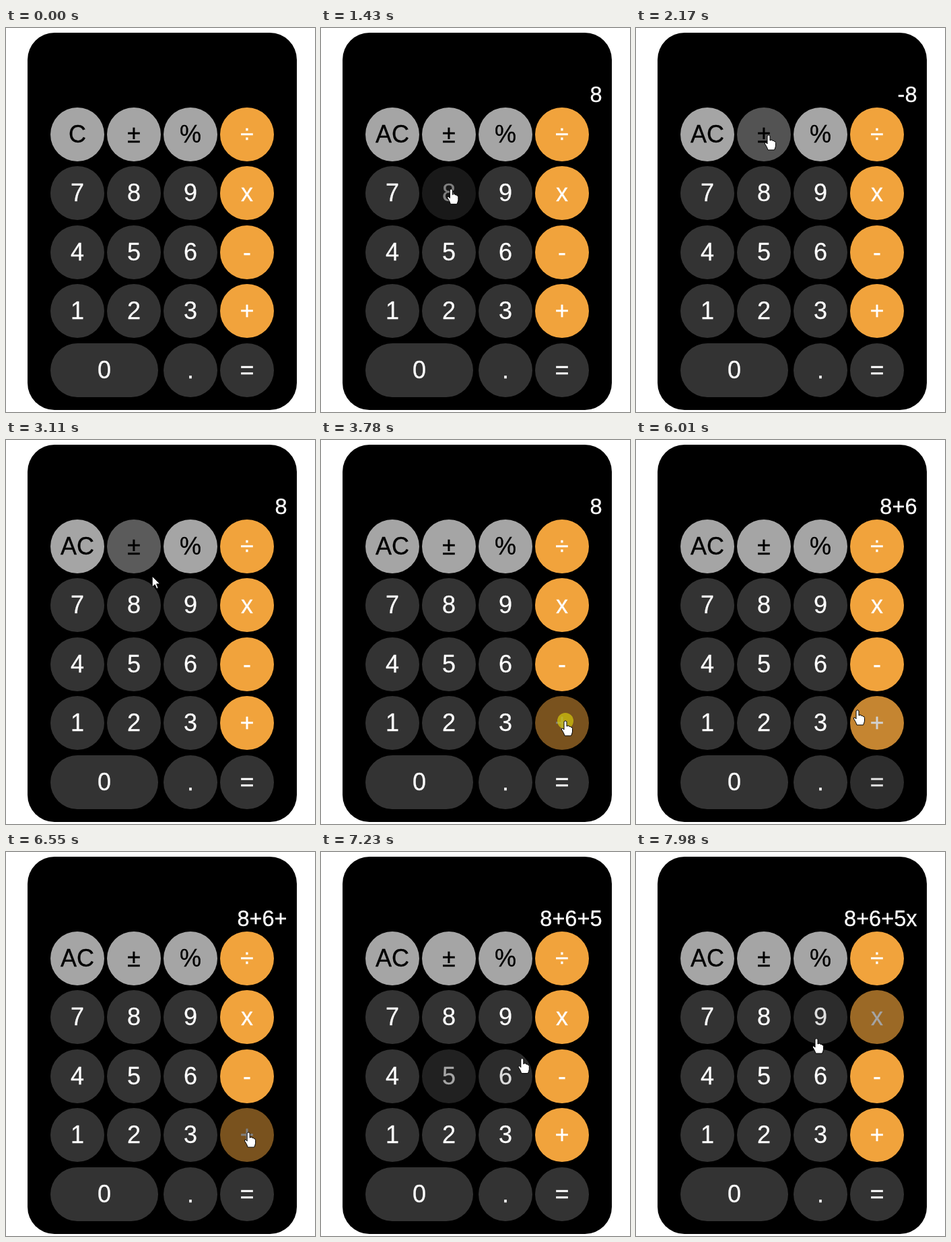
An HTML page that plays this animation: 459x570 px, repeating every 8000 ms.

```html
<!DOCTYPE html>
<html lang="en">
<head>
<meta charset="utf-8">
<title>Calculator</title>
<style>
  html, body { margin: 0; width: 100%; height: 100%; overflow: hidden; background: #fff; }
  svg { display: block; }
  text {
    font: 36px "Liberation Sans", Arial, sans-serif; text-anchor: middle;
    color: #fff; fill: currentColor; stroke: currentColor; stroke-width: .3;
  }
  .dark { color: #000; }
  #display { font-size: 32.5px; text-anchor: end; }
  .cursor { fill: #fff; stroke: #000; stroke-linejoin: round; }
</style>
</head>
<body>
<svg width="459" height="570" viewBox="0 0 459 570">
  <rect x="32" y="7" width="400" height="560" rx="40"/>
  <text id="display" x="417.5" y="110"></text>
  <g id="keys"></g>
  <g id="pointer">
    <circle id="dot" r="12" fill="#d4c80c" opacity=".7"/>
    <path id="arrow" class="cursor" d="M0 0V16L4 12.5 6.5 18.5 9 17.5 6.5 11.5H11.5Z"/>
    <path id="hand" class="cursor" d="M-2 1Q0-1.5 2 1V8L4 7Q6 7 6 8.5 8 7.6 8.5 9.5 10.5 9 10.5 11.5V16Q10 19 8.5 22H-1Q-2 18-5.5 13-6.5 10.5-4 11L-2 13Z"/>
  </g>
</svg>
<script>
const LOOP = 8000, FADE = 250, STEP = 5;
const $ = id => document.getElementById(id);

// Where the pointer rests and clicks; bend curves the way to a stop
const stops = [
  { arrive: 0, leave: 260, x: 398, y: 576 },
  { arrive: 950, leave: 1350, x: 193, y: 248, press: 1230, release: 1280, bend: -.28 },
  { arrive: 1770, leave: 2170, x: 197, y: 159, press: 1970, release: 2170 },
  { arrive: 2170, leave: 2930, x: 197, y: 159, press: 2370, release: 2570 },
  { arrive: 3660, leave: 3980, x: 363, y: 417, press: 3720, release: 3860, bend: .04 },
  { arrive: 4460, leave: 4900, x: 279, y: 333, press: 4530, release: 4660 },
  { arrive: 5320, leave: 5720, x: 360, y: 497 },
  { arrive: 6010, leave: 6010, x: 329, y: 401, bend: -.25 },
  { arrive: 6180, leave: 6530, x: 362, y: 417, press: 6350, release: 6480 },
  { arrive: 6850, leave: 7110, x: 212, y: 350, press: 6950, release: 7050 },
  { arrive: 7340, leave: 7850, x: 358, y: 248, press: 7600, release: 7720, bend: .08 },
  { arrive: 7980, leave: LOOP, x: 268, y: 277 }
];

function pointerAt(t) {
  const i = stops.findIndex(stop => t <= stop.leave), to = stops[i];
  if (t >= to.arrive) return [to.x, to.y];
  const from = stops[i - 1], dx = to.x - from.x, dy = to.y - from.y;
  const u = (t - from.leave) / (to.arrive - from.leave);
  const s = u * u * (3 - 2 * u), arc = (to.bend || 0) * 4 * s * (1 - s);
  return [from.x + dx * s - dy * arc, from.y + dy * s + dx * arc];
}

function add(parent, tag, attrs, content = '') {
  const el = document.createElementNS('http://www.w3.org/2000/svg', tag);
  for (const name in attrs) el.setAttribute(name, attrs[name]);
  el.textContent = content;
  return parent.appendChild(el);
}

function makeKey(label, col, row, extra = 0) {
  const x = 106 + 84 * col + extra, y = Math.floor(158 + 87.5 * row);
  const light = row === 0 && col < 3;
  const fill = light ? '#a5a5a5' : col === 3 && row < 4 ? '#f1a33c' : '#333';
  const group = add($('keys'), 'g', {});
  add(group, 'rect', { x: x - 40 - extra, y: y - 40, width: 80 + 2 * extra, height: 80, rx: 40, fill });
  const text = add(group, 'text', { x, y: y + 12, class: light ? 'dark' : '' }, label);
  const hit = (px, py) => Math.hypot(Math.max(0, Math.abs(px - x) - extra), py - y) < 40;
  return { label, group, text, hit, dim: 0 };
}

const keys = ['C±%÷', '789x', '456-', '123+'].flatMap((line, row) =>
  [...line].map((label, col) => makeKey(label, col, row)));
keys.push(makeKey('0', 0, 4, 40), makeKey('.', 2, 4), makeKey('=', 3, 4));

const keyAt = (x, y) => keys.find(key => key.hit(x, y));

// Hovered keys fade to half opacity and recover after the pointer leaves
function fadeKeys(t) {
  for (const key of keys) key.dim = 0;
  for (let s = 0; s < t; s += STEP) {
    const hovered = keyAt(...pointerAt(s)), change = Math.min(STEP, t - s) / FADE;
    for (const key of keys)
      key.dim = Math.max(0, Math.min(1, key.dim + (key === hovered ? change : -change)));
  }
  for (const key of keys) key.group.setAttribute('opacity', 1 - key.dim / 2);
}

function enter(value, { x, y }) {
  const { label } = keyAt(x, y);
  if (label !== '±') return value + label;
  return value.startsWith('-') ? value.slice(1) : '-' + value;
}

const show = (id, on) => $(id).setAttribute('visibility', on ? 'visible' : 'hidden');

function draw(t) {
  const [x, y] = pointerAt(t), over = keyAt(x, y);
  const value = stops.filter(stop => stop.release <= t).reduce(enter, '');
  fadeKeys(t);
  $('pointer').setAttribute('transform', `translate(${x} ${y})`);
  show('hand', over);
  show('arrow', !over);
  show('dot', stops.some(stop => stop.press <= t && t < stop.release));
  $('display').textContent = value;
  keys[0].text.textContent = value ? 'AC' : 'C';
}

const start = performance.now();
function tick() {
  draw((performance.now() - start) % LOOP);
  requestAnimationFrame(tick);
}
tick();
</script>
</body>
</html>
```
